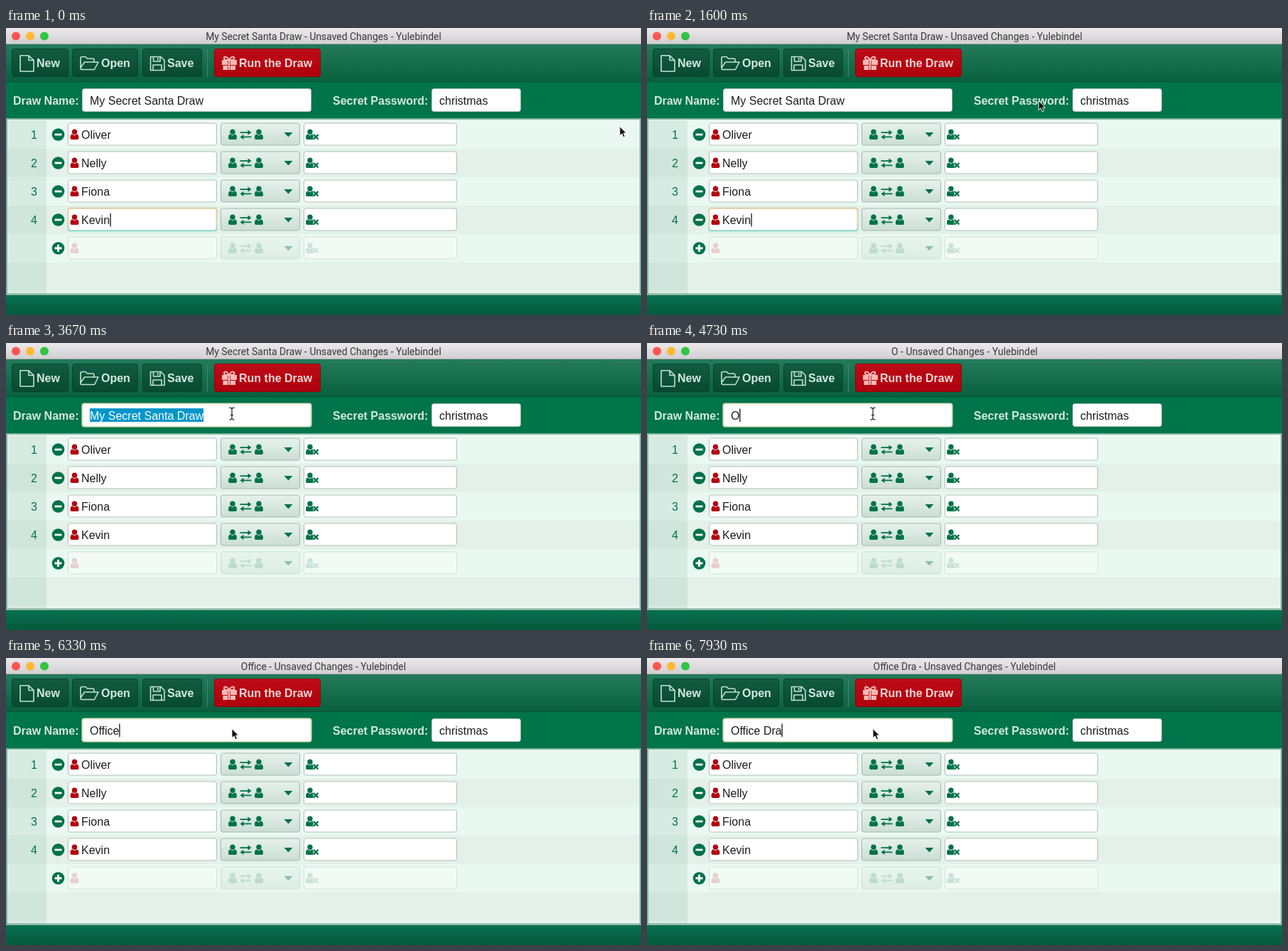
An HTML page that plays this animation: 894x404 px, repeating every 8000 ms.

```html
<!DOCTYPE html>
<html lang="en">
<head>
<meta charset="utf-8">
<title>Gift draw</title>
<style>
html, body { margin: 0; width: 100%; height: 100%; overflow: hidden; background: #007249; }
svg { display: block; }
text { font: 16px "Liberation Sans", Arial, sans-serif; white-space: pre; fill: #1c1c1c; }
.bold { font-weight: bold; fill: #d3eadf; }
.title { font: 13.9px Roboto, sans-serif; fill: #3a3a3a; text-anchor: middle; }
.line { fill: none; stroke: #c4e2d3; stroke-width: 1.6; stroke-linejoin: round; }
.green { fill: #007249; }
.red { fill: #b3000f; }
</style>
</head>
<body>
<svg id="stage" width="894" height="404" viewBox="0 0 894 404">
  <defs>
    <linearGradient id="bar" x2="0" y2="1"><stop stop-color="#ebe9eb"/><stop offset="1" stop-color="#d0ced0"/></linearGradient>
    <linearGradient id="tools" x2="0" y2="1"><stop stop-color="#237b5a"/><stop offset="1" stop-color="#09603f"/></linearGradient>
    <linearGradient id="dark" x2="0" y2="1"><stop stop-color="#125c42"/><stop offset="1" stop-color="#074a32"/></linearGradient>
    <linearGradient id="run" x2="0" y2="1"><stop stop-color="#bd0c18"/><stop offset="1" stop-color="#ae000c"/></linearGradient>
    <linearGradient id="foot" x2="0" y2="1"><stop stop-color="#087150"/><stop offset="1" stop-color="#045a3c"/></linearGradient>
    <linearGradient id="combo" x2="0" y2="1"><stop stop-color="#e6f2ec"/><stop offset="1" stop-color="#cbded5"/></linearGradient>
    <linearGradient id="glow" x2="0" y2="1"><stop stop-color="#e3cf9f"/><stop offset=".6" stop-color="#dfd5a8"/><stop offset="1" stop-color="#8fdccb"/></linearGradient>
    <g id="person">
      <circle cx="6" cy="3.8" r="3.7"/>
      <path d="M0 12C0 8.5 1.3 7 2.8 7Q6 9.8 9.2 7C10.7 7 12 8.5 12 12Q12 14.6 10 14.6H2Q0 14.6 0 12Z"/>
    </g>
    <path id="swap" d="M0 3H11V0L16 4L11 8V5H0ZM16 10H5V7L0 11L5 15V12H16Z" transform="scale(1 .9)"/>
  </defs>

  <rect width="894" height="23" fill="url(#bar)"/>
  <rect y="22" width="894" height="1" fill="#a9a9a9"/>
  <circle cx="14" cy="11.5" r="6" fill="#fc5652"/>
  <circle cx="34" cy="11.5" r="6" fill="#fdb934"/>
  <circle cx="54" cy="11.5" r="6" fill="#30c544"/>
  <text id="title" class="title" x="447" y="16.5"></text>

  <rect y="23" width="894" height="53" fill="url(#tools)"/>
  <rect y="75" width="894" height="1" fill="#075438"/>
  <rect y="76" width="894" height="52" fill="#00744a"/>
  <g fill="url(#dark)" stroke="#06422d">
    <rect x="8.5" y="29.5" width="79" height="39" rx="3"/>
    <rect x="93.5" y="29.5" width="92" height="39" rx="3"/>
    <rect x="192.5" y="29.5" width="83" height="39" rx="3"/>
  </g>
  <rect x="283" y="30" width="1" height="39" fill="#3b8a6b"/>
  <rect x="293.5" y="29.5" width="149" height="39" rx="3" fill="url(#run)" stroke="#92000a"/>
  <g class="line">
    <path d="M20 38.8H32L39 45.5V61H20ZM32 38.8V45.5H39"/>
    <path d="M105 56V42.5Q105 40.5 107 40.5H112L114.5 43H122Q124 43 124 45V48M105 56L110.5 48H130L124.5 58.5H106.5Q105 58.5 105 56"/>
    <path d="M203.5 40.5H218L223 45.5V59.5H203.5ZM207.5 40.5V47H217V40.5M207 59.5V52H219V59.5M213.8 42V45.5"/>
  </g>
  <g fill="#f5b9b5">
    <path d="M304 45H312V52H304ZM316 45H325V52H316ZM305.5 53H312V59H305.5ZM316 53H323V59H316ZM312.7 45H315.3V59H312.7Z"/>
    <path d="M314 45C309 36 304 43 309 45ZM314 45C319 36 325 43 319 45Z" fill="none" stroke="#f5b9b5" stroke-width="2"/>
  </g>
  <text class="bold" x="43" y="55">New</text>
  <text class="bold" x="134" y="55">Open</text>
  <text class="bold" x="227" y="55">Save</text>
  <text class="bold" x="328" y="55" style="fill:#f8d8d5">Run the Draw</text>
  <text class="bold" x="10" y="107.5">Draw Name:</text>
  <text class="bold" x="460" y="107.5">Secret Password:</text>
  <rect x="107.5" y="85.5" width="322" height="32" rx="3" fill="#fff" stroke="#b5c6bd"/>
  <rect id="nameFocus" x="107.5" y="85.5" width="322" height="32" rx="3" fill="none" stroke="#dfe5c3" stroke-width="2"/>
  <rect x="599.5" y="85.5" width="125" height="32" rx="3" fill="#fff" stroke="#b5c6bd"/>
  <text x="610" y="107.5">christmas</text>
  <rect id="mark" y="92" height="19" fill="#0096c9"/>
  <text id="name" x="118" y="107.5"><tspan></tspan><tspan fill="#fff"></tspan></text>
  <rect id="nameCaret" y="92.5" width="1.2" height="18.5"/>

  <g id="table"></g>
  <rect id="rowFocus" x="87.5" y="253.5" width="209" height="32" rx="3" fill="none" stroke="url(#glow)" stroke-width="2"/>
  <rect id="rowCaret" x="146.5" y="261" width="1.2" height="18.5"/>
  <rect x="1" y="128" width="892" height="246.5" fill="none" stroke="#7fb69d" stroke-width="2"/>
  <rect y="376" width="894" height="28" fill="url(#foot)"/>
  <rect y="375" width="894" height="1" fill="#b2c2ba"/>

  <path id="arrow" d="M0 0V13L3 10.3L5.2 15.2L7.5 14.2L5.4 9.5H9.4Z" fill="#111" stroke="#fff" stroke-width=".9"/>
  <path id="beam" d="M-3.5 -8.5Q0 -8.5 0 -6V6Q0 8.5 -3.5 8.5M3.5 -8.5Q0 -8.5 0 -6V6Q0 8.5 3.5 8.5M-2 2H2" fill="none" stroke="#333" stroke-width="1.3"/>
</svg>
<script>
const LOOP = 8000;
const $ = id => document.getElementById(id);
const show = (id, on) => $(id).setAttribute('visibility', on ? 'visible' : 'hidden');
const people = ['Oliver', 'Nelly', 'Fiona', 'Kevin'];

const use = (id, x, y, cls = 'green') => `<use href="#${id}" x="${x}" y="${y}" class="${cls}"/>`;
const box = (x, y, w, fill, stroke) =>
  `<rect x="${x + .5}" y="${y + .5}" width="${w - 1}" height="31" rx="3" fill="${fill}" stroke="${stroke}"/>`;

function row(i) {
  const y = 130 + 40 * i, mid = y + 20, name = people[i], odd = i % 2;
  const h = Math.min(40, 374 - y);
  let s = `<rect y="${y}" width="894" height="${h}" fill="${odd ? '#e3f1ea' : '#eaf8f2'}"/>
    <rect y="${y}" width="57" height="${h}" fill="${odd ? '#d0e5db' : '#d8ebe2'}"/>`;
  if (i > people.length) return s;
  const edge = name ? '#b3bfb9' : '#d3e0d9', fill = name ? '#fff' : '#f2faf6', fade = name ? 1 : .16;
  s += `<circle cx="73.5" cy="${mid}" r="8.8" class="green"/>
    <path d="M68.5 ${mid}h10${name ? '' : `M73.5 ${mid - 5}v10`}" stroke="#fff" stroke-width="2.8"/>`;
  s += box(87, y + 3.5, 210, fill, edge) + box(419, y + 3.5, 216, fill, edge);
  s += `<g opacity="${name ? 1 : .4}">${box(302, y + 3.5, 112, 'url(#combo)', '#a5b5ad')}
    <path d="M391.5 ${mid - 3}h12l-6 6.5z" class="green"/></g>`;
  s += `<g opacity="${fade}">` + use('person', 90.5, mid - 7.5, 'red')
    + use('person', 313, mid - 7.5) + use('person', 350, mid - 7.5)
    + `<g transform="translate(329.5 ${mid - 6.5})">${use('swap', 0, 0)}</g>`
    + use('person', 422, mid - 7.5)
    + `<path d="M433 ${mid}l6.5 6.5m0 -6.5l-6.5 6.5" stroke="#eaf8f2" stroke-width="4"/>
       <path d="M433 ${mid}l6.5 6.5m0 -6.5l-6.5 6.5" stroke="#007249" stroke-width="2.4"/></g>`;
  if (name) s += `<text x="106" y="${mid + 5.5}">${name}</text>
    <text x="35" y="${mid + 5.5}" style="fill:#007249">${i + 1}</text>`;
  return s;
}
$('table').innerHTML = '<rect y="127" width="894" height="3" fill="#eaf8f2"/>' + [0, 1, 2, 3, 4, 5, 6].map(row).join('');

const OLD = 'My Secret Santa Draw', NEW = 'Office Dra';
const keys = [4730, 5270, 5470, 5670, 5930, 6070, 6930, 7200, 7670, 7930];

function pointer(t) {
  const p = Math.min(1, Math.max(0, (t - 700) / 1430)) ** 1.3;
  const s = p * p * (3 - 2 * p);
  return [864 - 546 * s, 99.5 + 39 * (1 - s) ** 3];
}
const inside = (x, y, left, right) => x > left && x < right && y > 85 && y < 117;

function draw(t) {
  const typed = keys.filter(k => t >= k).length;
  const text = typed ? NEW.slice(0, typed) : OLD;
  const from = typed || t < 2870 ? text.length : t < 3000 ? OLD.lastIndexOf(' ') + 1 : 0;
  $('title').textContent = text + ' - Unsaved Changes - Yulebindel';

  const name = $('name');
  name.children[0].textContent = text.slice(0, from);
  name.children[1].textContent = text.slice(from);
  const full = name.getComputedTextLength();
  const start = name.children[0].getComputedTextLength();
  $('mark').setAttribute('x', 118 + start);
  $('mark').setAttribute('width', full - start);
  $('nameCaret').setAttribute('x', 117.8 + full);

  // The caret blinks every half second, restarting at each key
  const since = typed ? t - keys[typed - 1] : t - 2730;
  show('nameCaret', since >= 0 && from === text.length && since % 1000 < 460);
  const focused = t >= 2670;
  show('nameFocus', focused);
  show('rowFocus', !focused);
  show('rowCaret', !focused && (t + 730) % 1000 < 500 || t < 270);

  const [x, y] = pointer(t);
  const beam = t < 5730 && (inside(x, y, 107, 430) || inside(x, y, 599, 725));
  show('beam', beam);
  show('arrow', !beam);
  for (const id of ['beam', 'arrow']) $(id).setAttribute('transform', `translate(${x} ${y})`);
}

const begin = performance.now();
function tick() {
  draw((performance.now() - begin) % LOOP);
  requestAnimationFrame(tick);
}
tick();
</script>
</body>
</html>
```
